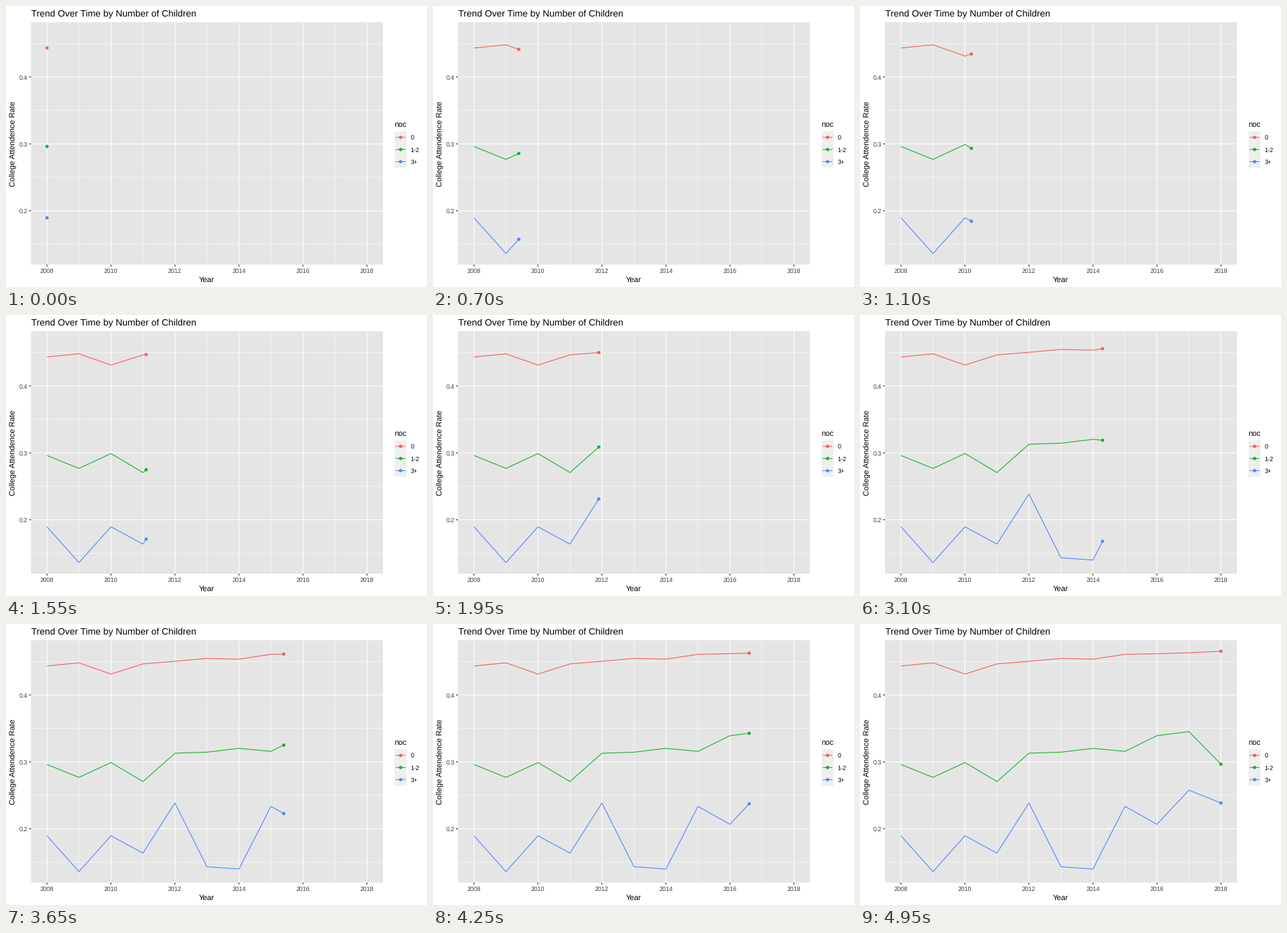
A matplotlib script that plays this animation: 600x400 px, repeating every 5000 ms.

```python
import numpy as np
import matplotlib.pyplot as plt
from matplotlib.animation import FuncAnimation
from matplotlib.patches import Circle, Rectangle

plt.rcParams.update({
    "font.family": "Liberation Sans",
    "text.hinting": "none",
    "text.hinting_factor": 8,
})

W, H, DPI = 600, 400, 72
FRAMES, INTERVAL = 100, 50

# Type sizes and spacing all follow from one base size.
BASE = 11
TITLE, SMALL, GAP = 1.2 * BASE, 0.8 * BASE, BASE / 2
TICK_LEN, KEY_SIZE = BASE / 4, 17.28
LINE_W, DOT_R = 1.07, 2.33

PANEL, KEY = "#e5e5e5", "#efefef"
TEXT, TICK = "#404040", "#272727"

# Turning points of each line, one per year.
YEARS = np.arange(2008, 2019)
GROUPS = [
    ("0", "#f35e5a", [.4433, .4480, .4312, .4464, .4503, .4546,
                      .4535, .4607, .4616, .4630, .4653]),
    ("1-2", "#17b12b", [.2961, .2768, .2990, .2706, .3129, .3145,
                        .3202, .3157, .3391, .3452, .2965]),
    ("3+", "#5086ff", [.1895, .1360, .1895, .1637, .2385, .1433,
                       .1398, .2335, .2067, .2577, .2385]),
]
# Each year is reached on a whole frame.
KNOTS = np.round(np.linspace(0, FRAMES - 1, len(YEARS)))


def px(year):
    return 58.4 + 45.6 * (np.asarray(year) - YEARS[0])


def py(rate):
    return 101 + 952.5 * (0.4 - np.asarray(rate))


# The panel reaches 5 % beyond the data on every side.
all_rates = [rate for _, _, rates in GROUPS for rate in rates]
x_pad = (px(YEARS[-1]) - px(YEARS[0])) / 20
y_pad = (py(min(all_rates)) - py(max(all_rates))) / 20
LEFT, RIGHT = px(YEARS[0]) - x_pad, px(YEARS[-1]) + x_pad
TOP, BOTTOM = py(max(all_rates)) - y_pad, py(min(all_rates)) + y_pad
MID_X, MID_Y = (LEFT + RIGHT) / 2, (TOP + BOTTOM) / 2

fig = plt.figure(figsize=(W / DPI, H / DPI), dpi=DPI, facecolor="white")
ax = fig.add_axes([0, 0, 1, 1])
ax.set_xlim(0, W)
ax.set_ylim(H, 0)
ax.axis("off")


def box(x, y, w, h, color):
    ax.add_patch(Rectangle((x, y), w, h, fc=color, lw=0, snap=False, zorder=0))


def line(xs, ys, color, width=LINE_W, z=2):
    return ax.plot(xs, ys, color=color, lw=width, zorder=z, snap=False,
                   solid_capstyle="butt", solid_joinstyle="round")[0]


def dot(x, y, color):
    return ax.add_patch(Circle((x, y), DOT_R, fc=color, lw=0, zorder=3))


def label(x, y, s, size, color="black", **kw):
    ax.text(x, y, s, fontsize=size, color=color, va="baseline", **kw)


def draw_grid():
    box(LEFT, TOP, RIGHT - LEFT, BOTTOM - TOP, PANEL)
    for i, rate in enumerate(np.arange(0.15, 0.46, 0.05)):
        y, major = py(rate), i % 2
        line([LEFT, RIGHT], [y, y], "white", LINE_W * (1 + major) / 2, 1)
        if major:
            line([LEFT - TICK_LEN, LEFT], [y, y], TICK)
            label(LEFT - 4.9, y + 3.5, f"{rate:.1f}", SMALL, TEXT, ha="right")
    for i, year in enumerate(YEARS):
        x, major = px(year), 1 - i % 2
        line([x, x], [TOP, BOTTOM], "white", LINE_W * (1 + major) / 2, 1)
        if major:
            line([x, x], [BOTTOM, BOTTOM + TICK_LEN], TICK)
            label(x, 380, str(year), SMALL, TEXT, ha="center")


def draw_titles():
    label(LEFT, 15, "Trend Over Time by Number of Children", TITLE)
    label(MID_X - 0.5, 393, "Year", BASE, ha="center")
    label(14, MID_Y, "College Attendence Rate", BASE,
          rotation=90, ha="center", rotation_mode="anchor")


def draw_legend():
    x, y = RIGHT + 3 * GAP, MID_Y - KEY_SIZE
    mid_x, arm = x + KEY_SIZE / 2, 0.4 * KEY_SIZE
    label(x, y - 5, "noc", BASE)
    box(x, y, KEY_SIZE, KEY_SIZE * len(GROUPS), KEY)
    for i, (name, color, _) in enumerate(GROUPS):
        mid_y = y + KEY_SIZE * (i + 0.5)
        line([mid_x - arm, mid_x + arm], [mid_y, mid_y], color)
        dot(mid_x, mid_y, color)
        label(x + KEY_SIZE + GAP, mid_y + 3.3, name, SMALL)


draw_grid()
draw_titles()
draw_legend()
trails = [line([], [], color) for _, color, _ in GROUPS]
heads = [dot(px(YEARS[0]), py(rates[0]), color) for _, color, rates in GROUPS]


def update(frame):
    now = np.interp(frame, KNOTS, YEARS)
    stops = np.append(YEARS[YEARS < now], now)
    xs = px(stops)
    for (_, _, rates), trail, head in zip(GROUPS, trails, heads):
        ys = py(np.interp(stops, YEARS, rates))
        trail.set_data(xs, ys)
        head.center = xs[-1], ys[-1]
    return trails + heads


anim = FuncAnimation(fig, update, frames=FRAMES, interval=INTERVAL,
                     repeat=True, repeat_delay=0, blit=False)
plt.show()
```
